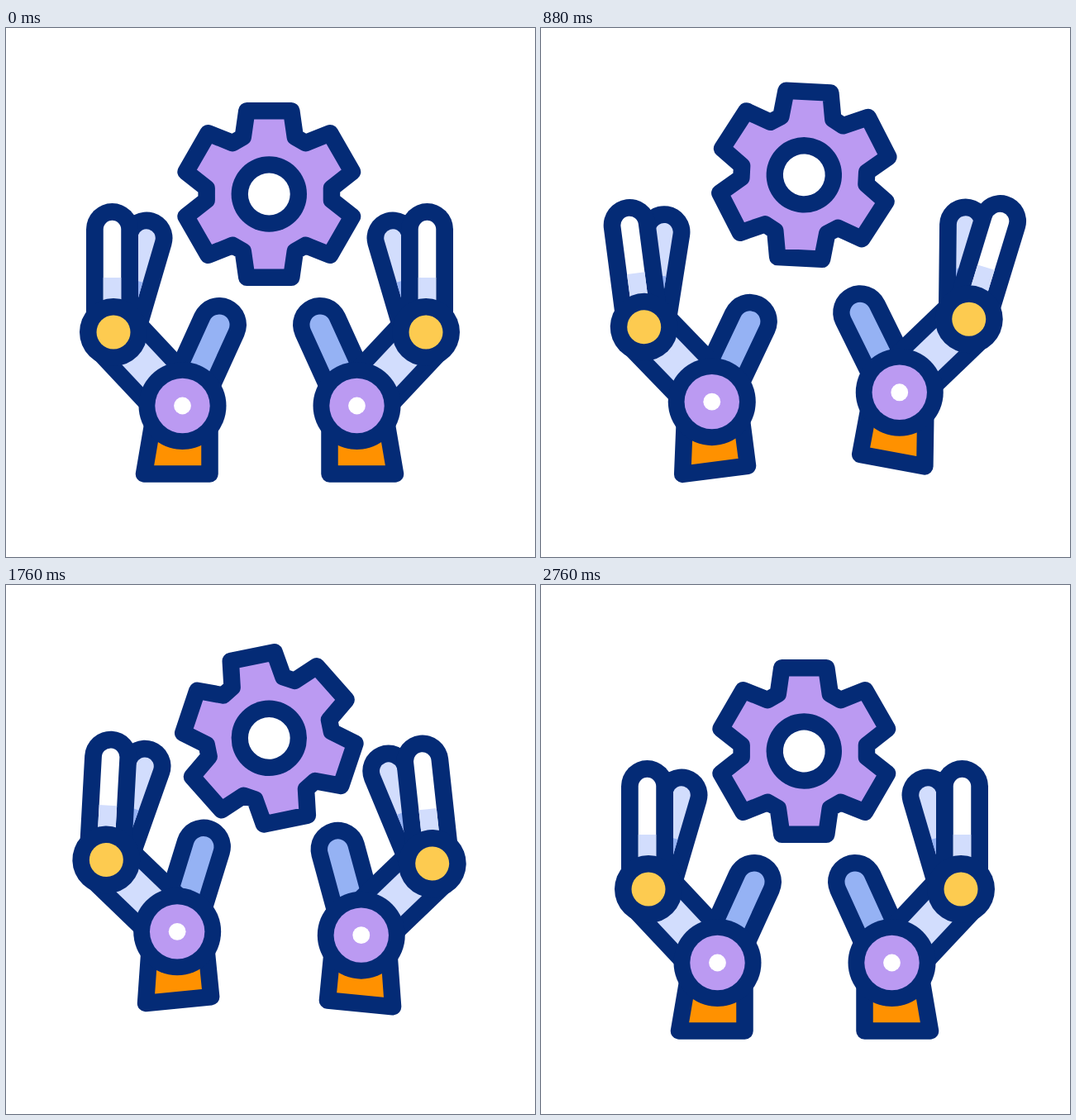
Recreate the animation shown at these times as an HTML page. Size 640x640 px, loop 3 s.

```html
<!DOCTYPE html>
<html lang="en">
<head>
<meta charset="utf-8">
<title>Robot hands juggling a gear</title>
<style>
  html, body { margin: 0; width: 100%; height: 100%; overflow: hidden; background: #fff; }
  svg { display: block; width: 100vw; height: 100vh; }
</style>
</head>
<body>
<svg id="stage" viewBox="0 0 640 640"></svg>
<script>
const LOOP = 3000, STEP = 40, LAG = 120;
const DIP = 430, THROW = 1000, CATCH = 2000, REST = 2640;
const NAVY = '#042b76', PURPLE = '#bb9af2', YELLOW = '#fdcb50', ORANGE = '#ff9100';
const PALE = '#d2ddfd', BLUE = '#95b2f4', WHITE = '#fff';

// Sine ease; skew below 1 makes the move start faster
const ease = (p, skew) => (1 - Math.cos(Math.PI * p ** skew)) / 2;

// Eases from 0 through the given [time, value, skew] turning points
const track = (...points) => t => {
  let from = 0, value = 0;
  for (const [to, next, skew = 1] of points) {
    if (t < to) return value + (next - value) * ease(Math.max(0, t - from) / (to - from), skew);
    from = to;
    value = next;
  }
  return value;
};

const hand = {
  x: track([DIP, 0], [960, -9.8], [REST, 0]),
  y: track([DIP, 26.5, .6], [1390, -38.5, .67], [1560, -38.5], [2400, 0]),
  base: track([DIP, 0], [THROW, -11.8], [1700, -5.6, .8], [CATCH, -5], [REST, 0, .6]),
  arm: track([DIP, 3.8], [THROW, -.8], [1820, -1.6], [REST, 0]),
  fingers: track([DIP, 14.5], [THROW, -20.7], [CATCH, 8.6, .75], [REST, 0, .75]),
  thumb: track([DIP, -6.5], [THROW, 2.1, .5], [CATCH, -11, 1], [REST, 0, .5])
};
const gearY = track([440, 23], [1290, -64.5], [1455, -64.5], [2040, 27], [2760, 0, .75]);
const gearTurn = track([440, -5.5], [1230, 5.8, .7], [1280, 5.8], [2680, -60]);

function add(parent, tag, attrs = {}) {
  const el = document.createElementNS('http://www.w3.org/2000/svg', tag);
  for (const k in attrs) el.setAttribute(k, attrs[k]);
  return parent.appendChild(el);
}
const group = (parent, transform = '') => add(parent, 'g', { transform });
const line = (parent, x1, y1, x2, y2, stroke, width, cap = 'round') =>
  add(parent, 'line', { x1, y1, x2, y2, stroke, 'stroke-width': width, 'stroke-linecap': cap });
const disc = (parent, r, fill) => add(parent, 'circle', { r, fill });
const outline = (parent, points, fill) => add(parent, 'polygon', {
  points, fill, stroke: NAVY, 'stroke-width': 20.5, 'stroke-linejoin': 'round'
});
const turn = (el, deg, x = 0, y = 0) => el.setAttribute('transform', `rotate(${deg} ${x} ${y})`);

function finger(parent, x, y, baseX, top, low) {
  const el = group(parent), k = 66 / Math.hypot(x - baseX, y);
  line(el, x, y, baseX, 0, NAVY, 63);
  line(el, x, y, baseX, 0, top, 21.5);
  line(el, baseX + (x - baseX) * k, y * k, baseX, 0, low, 21.5, 'butt');
  return el;
}

function makeHand(stage, transform, lag) {
  const palm = group(group(stage, transform));
  const base = group(palm), thumb = group(palm), arm = group(palm);
  outline(base, '-46.5,82.5 33,82.5 33,18 -35.5,18', ORANGE);
  line(thumb, 44.5, -98, 0, 0, NAVY, 66);
  line(thumb, 44.5, -98, 0, 0, BLUE, 25);
  const knuckle = group(arm, 'translate(-83.5 -89)');
  const link = group(knuckle);
  line(link, 0, 0, 83.5, 89, NAVY, 79, 'butt');
  line(link, 0, 0, 83.5, 89, PALE, 39, 'butt');
  const back = finger(knuckle, 40, -114, 6.5, PALE, BLUE);
  const front = finger(knuckle, -1.5, -124.5, -1.5, WHITE, PALE);
  disc(knuckle, 41, NAVY);
  disc(knuckle, 20.5, YELLOW);
  disc(palm, 53, NAVY);
  disc(palm, 33.2, PURPLE);
  disc(palm, 10.4, WHITE);

  return time => {
    const t = time - lag, tilt = hand.base(t), swing = hand.arm(t);
    const bend = hand.fingers(t) - swing;
    palm.setAttribute('transform', `translate(${213.5 + hand.x(t)} ${457 + hand.y(t)})`);
    turn(base, tilt);
    turn(thumb, hand.thumb(t));
    turn(arm, swing);
    turn(link, tilt / 4);
    turn(front, bend);
    turn(back, bend, 21.5, 6);
  };
}

function makeGear(stage) {
  const gear = group(stage), points = [];
  for (let tooth = 0; tooth < 360; tooth += 60) {
    for (const [deg, r] of [[-24.5, 76], [-15, 104.3], [15, 104.3], [24.5, 76]]) {
      const a = (tooth + deg) * Math.PI / 180;
      points.push(`${(r * Math.sin(a)).toFixed(2)},${(-r * Math.cos(a)).toFixed(2)}`);
    }
  }
  outline(gear, points.join(' '), PURPLE);
  disc(gear, 45.7, NAVY);
  disc(gear, 25.4, WHITE);
  return time => gear.setAttribute('transform',
    `translate(318.3 ${201 + gearY(time)}) rotate(${gearTurn(time)})`);
}

const stage = document.getElementById('stage');
const parts = [
  makeGear(stage),
  makeHand(stage, '', LAG),
  makeHand(stage, 'translate(638 0) scale(-1 1)', 0)
];
const start = performance.now();

function draw() {
  const t = (performance.now() - start) % LOOP;
  const time = Math.floor(t / STEP) * STEP;
  parts.forEach(update => update(time));
  requestAnimationFrame(draw);
}
draw();
</script>
</body>
</html>
```
